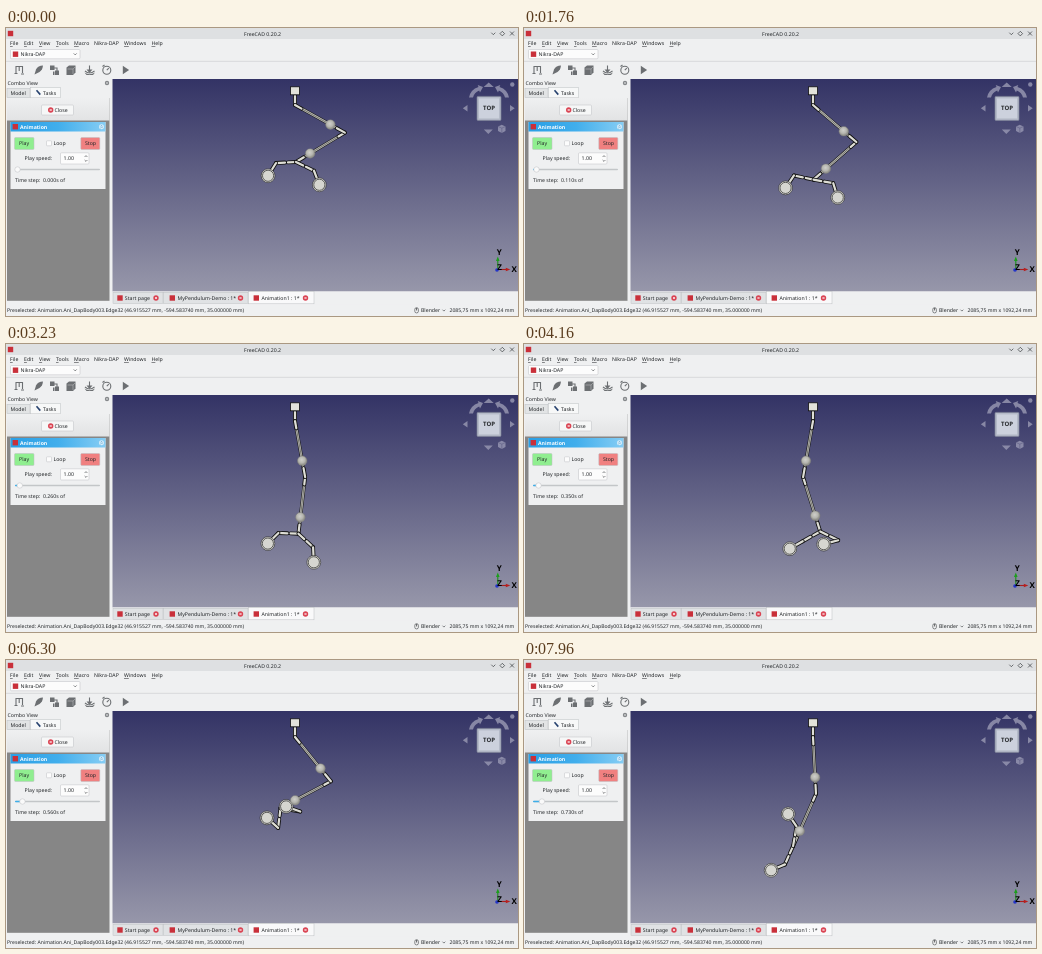
Animation of 512x288 px, one loop 8000 ms. Source, as an HTML page:

```html
<!DOCTYPE html>
<html lang="en">
<head>
<meta charset="utf-8">
<title>Pendulum animation</title>
<style>
  html, body { margin: 0; width: 100%; height: 100%; overflow: hidden; background: #eff0f1; }
  svg { display: block; width: 100vw; height: 100vh; }
  text { font: 5.2px "Noto Sans", sans-serif; fill: #232629; text-rendering: geometricPrecision; white-space: pre; }
  .bold { font-weight: 700; }
  .axis { font: 700 8px "Open Sans", sans-serif; fill: #000; }
  .u { text-decoration: underline; text-decoration-thickness: .3px; }
  .logo { fill: #c9303a; }
  .edge { stroke: #bcbfc2; stroke-width: .5; }
  .nav { fill: #9494b0; fill-opacity: .85; }
  .icon { fill: none; stroke: #6c6f72; stroke-width: 1.1; }
  .icon .solid { fill: #6c6f72; stroke: none; }
</style>
</head>
<body>
<svg viewBox="0 0 512 288">
  <defs>
    <linearGradient id="sky" x2="0" y2="1"><stop stop-color="#333365"/><stop offset="1" stop-color="#9797aa"/></linearGradient>
    <linearGradient id="head"><stop stop-color="#2a9fe5"/><stop offset=".5" stop-color="#41aeec"/><stop offset="1" stop-color="#86cdf4"/></linearGradient>
    <linearGradient id="strip" x2="0" y2="1"><stop stop-color="#eff0f1"/><stop offset="1" stop-color="#e2e3e4"/></linearGradient>
    <radialGradient id="ball" cx=".45" cy=".4"><stop stop-color="#cfcfca"/><stop offset=".65" stop-color="#b6b6b0"/><stop offset="1" stop-color="#94948e"/></radialGradient>
    <g id="close"><circle r="2.7" fill="#da4453"/><path d="M-1-1L1 1M1-1L-1 1" stroke="#fff" stroke-width=".7"/></g>
    <rect id="logo" class="logo" x="-2.7" y="-2.7" width="5.4" height="5.4"/>
  </defs>

  <!-- window frame, menus and toolbars -->
  <rect width="512" height="288" fill="#eff0f1"/>
  <rect width="512" height="11" fill="#dee0e2"/>
  <use href="#logo" x="4.5" y="5.5"/>
  <text x="238" y="7.6">FreeCAD 0.20.2</text>
  <path d="M485.300 4.700l2 2 2-2M496.300 3.300l2.300 2.300-2.300 2.300-2.300-2.300zM504 3.500l4 4M508 3.500l-4 4" fill="none" stroke="#34383c" stroke-width=".7"/>
  <g id="menu"></g>
  <rect class="edge" x="4.500" y="21.500" width="69.500" height="9.300" rx="1" fill="#fcfcfc"/>
  <use href="#logo" x="9.500" y="26.200"/>
  <text x="14.500" y="28">Nikra-DAP</text>
  <path d="M67.700 25.400l1.500 1.500 1.500-1.500" fill="none" stroke="#34383c" stroke-width=".6"/>
  <path class="edge" d="M0 33.300H512"/>
  <g class="icon">
    <path d="M10 45V38.500h6.500V45M13.200 38.500V43M8.500 45.500h3M15 46h3"/>
    <path class="solid" d="M28.500 46.500l1.500-5q2-4 7-4-.5 4.500-3.500 6.500z"/>
    <path d="M46.500 40h4.500v4.500"/>
    <path class="solid" d="M44 37.500h4.500V42H44zM49 42.500h4V47h-4zM47 43.500h1.500V47H47z"/>
    <path class="solid" d="M60.500 39.500l2.500-2h6.500v7l-2.500 2.500h-6.500z"/>
    <path d="M61.500 41h5.500l2-2M67 41v5" stroke="#b9bbbd" stroke-width=".6"/>
    <path d="M83.500 37.500v5M79 43q4.500 4 9.500 0"/>
    <path class="solid" d="M80.500 41.500h6l-3 3.500zM78.500 44.500q5 3.500 10.500 0l-2 2.500h-6.500z"/>
    <circle cx="100.800" cy="42.200" r="4"/><path d="M100.800 42.200l2-2M98.500 37l-2 1.500"/>
    <path class="solid" d="M116.800 37.800v8.400l6.300-4.200z"/>
  </g>

  <!-- task panel -->
  <text x="1.500" y="57.200">Combo View</text>
  <circle cx="101" cy="55" r="2.200" fill="#85888b"/>
  <path d="M100.200 54.200l1.600 1.600M101.800 54.200l-1.600 1.600" stroke="#fff" stroke-width=".5"/>
  <rect class="edge" x="1" y="60.500" width="23" height="9" fill="#e2e4e5"/>
  <rect class="edge" x="24.500" y="59.300" width="30" height="10.500" fill="#f7f8f8"/>
  <text x="4.500" y="66.800">Model</text>
  <path d="M30.500 62.300l3.800 4.300" stroke="#26416e" stroke-width="1.600"/>
  <text x="37" y="66.800">Tasks</text>
  <rect x="1" y="70" width="102.500" height="202.800" fill="#868686"/>
  <rect x="1" y="70" width="102.500" height="22.500" fill="url(#strip)"/>
  <rect class="edge" x="35.500" y="77" width="32" height="10" rx="1" fill="#f6f7f7"/>
  <use href="#close" x="44.700" y="82"/>
  <text x="48.500" y="83.900">Close</text>
  <rect x="4.500" y="94" width="95" height="67" fill="#eff0f1"/>
  <rect x="4.500" y="94" width="95" height="9.500" fill="url(#head)"/>
  <use href="#logo" x="9.300" y="98.700"/>
  <text x="14" y="100.600" class="bold" style="fill:#fff">Animation</text>
  <circle cx="95.500" cy="98.700" r="2.500" fill="#d9effb"/>
  <path d="M94.300 98.500l1.200-1.200 1.200 1.200M94.300 100.200l1.200-1.200 1.200 1.200" fill="none" stroke="#2f83bb" stroke-width=".5"/>
  <rect class="edge" x="8.500" y="109.500" width="19.500" height="12" rx="1" fill="#90ee90"/>
  <text x="13" y="117.300">Play</text>
  <rect class="edge" x="40.500" y="112.800" width="5" height="5" rx=".6" fill="#fcfcfc"/>
  <text x="47.500" y="117.300">Loop</text>
  <rect class="edge" x="74.800" y="109.500" width="19" height="12" rx="1" fill="#f08080"/>
  <text x="79" y="117.300">Stop</text>
  <text x="18.500" y="132.300">Play speed:</text>
  <rect class="edge" x="54.500" y="124.800" width="28.500" height="11.200" rx="1" fill="#fcfcfc"/>
  <text x="57.600" y="132.200">1.00</text>
  <path d="M78.600 129l1.400-1.400 1.400 1.400M78.600 132l1.400 1.400 1.400-1.400" fill="none" stroke="#34383c" stroke-width=".6"/>
  <rect x="9" y="140.700" width="85" height="1.600" rx=".8" fill="#c3c6c8"/>
  <rect id="filled" x="9" y="140.700" height="1.600" rx=".8" fill="#3daee9"/>
  <circle id="handle" class="edge" cy="141.500" r="2.700" fill="#fafafa"/>
  <text id="label" x="9" y="154.200"></text>

  <!-- 3D view -->
  <rect x="106.500" y="51" width="405.500" height="212.500" fill="url(#sky)"/>
  <g class="nav">
    <path d="M456.800 80.300l4.700-3.300v6.600zM508.700 80.300l-4.700-3.300v6.600zM482.300 106l-4.500-4.500h9zM482.700 54.500l-5 4.500h10z"/>
    <path d="M463 69.500q1.500-8 9.500-10.500l-.8-2 5.300 2-3 5.500-.8-2q-5 2-6.200 7zM503 69.500q-1.500-8-9.500-10.500l.8-2-5.300 2 3 5.500.8-2q5 2 6.200 7z"/>
    <circle cx="506.300" cy="56.500" r="2.200"/>
    <path d="M492 98.500l3.800-1.700 3.700 1.700v4.500l-3.700 2-3.800-2z"/>
    <path d="M492 98.500l3.800 1.600 3.700-1.600M495.800 100.100v4.900" fill="none" stroke="#57577e" stroke-width=".5"/>
  </g>
  <rect x="471" y="68.400" width="24" height="24" rx="1" fill="#b4bac8" stroke="#7d8296" stroke-width=".7"/>
  <rect x="473" y="70.400" width="20" height="20" fill="#ccd1dd"/>
  <text x="483" y="82.400" text-anchor="middle" class="bold" style="font-size:6px">TOP</text>
  <path d="M491.800 241.500V231" stroke="#1c8f1c" stroke-width="1.100"/>
  <path d="M490 233l1.800-4.500 1.800 4.500z" fill="#1c9f1c"/>
  <path d="M491.800 241.500H501" stroke="#a81e1e" stroke-width="1.100"/>
  <path d="M499.800 239.700l4.500 1.800-4.500 1.800z" fill="#b81e1e"/>
  <circle cx="491" cy="242" r="1.800" fill="#2435c8"/>
  <text class="axis" x="490.800" y="226.800">Y</text>
  <text class="axis" x="505.500" y="243.500">X</text>
  <text class="axis" x="491.300" y="242.300">Z</text>
  <g id="rig"></g>

  <!-- document tabs and status bar -->
  <rect x="106.500" y="263.500" width="405.500" height="13" fill="#eff0f1"/>
  <g class="edge" fill="#e0e2e4">
    <rect x="107" y="264.300" width="50" height="11"/>
    <rect x="157.500" y="264.300" width="84.500" height="11"/>
    <rect x="242.500" y="263.600" width="65.500" height="12.200" fill="#f9f9fa"/>
  </g>
  <use href="#logo" x="114" y="270"/><text x="118.800" y="271.800">Start page</text><use href="#close" x="150" y="270"/>
  <use href="#logo" x="166.300" y="270"/><text x="171.500" y="271.800">MyPendulum-Demo : 1*</text><use href="#close" x="234.500" y="270"/>
  <use href="#logo" x="250.300" y="270"/><text x="255.500" y="271.800">Animation1 : 1*</text><use href="#close" x="299.500" y="270"/>
  <text x="1" y="284.200" style="font-size:5.100px">Preselected: Animation.Ani_DapBody003.Edge32 (46.915527 mm, -594.583740 mm, 35.000000 mm)</text>
  <rect x="408.800" y="279.700" width="3.600" height="5.200" rx="1.700" fill="#f4f4f4" stroke="#3a3d40" stroke-width=".6"/>
  <path d="M410.600 280v2.500" stroke="#3a3d40" stroke-width=".8"/>
  <text x="415" y="284.200">Blender</text>
  <path d="M436.500 281.700l1.400 1.400 1.400-1.400" fill="none" stroke="#34383c" stroke-width=".6"/>
  <text x="443.500" y="284.200" style="font-size:5.100px">2085,75 mm x 1092,24 mm</text>
</svg>

<script>
const LOOP = 8000;
const $ = id => document.getElementById(id);

const menu = { File: 4, Edit: 18, View: 33, Tools: 50, Macro: 68, "Nikra-DAP": 88, Windows: 118, Help: 145.5 };
$("menu").innerHTML = Object.entries(menu).map(([name, x]) =>
  `<text x="${x}" y="17.300"><tspan class="${name[0] === "N" ? "" : "u"}">${name[0]}</tspan>${name.slice(1)}</text>`).join("");

// step, then angles in degrees: upper link, lower link, left arm, left tip, right arm, right tip
const KEYS = [
  [0, 29, 149, 177, 122, 26, 69],
  [17, 53.5, 125.5, 198, 127, 4, 78],
  [24, 73, 104, 189, 132, 35, 88],
  [29, 90, 86, 170, 140, 50, 92],
  [32, 99, 77, 159, 146, 44, 120],
  [35, 100, 72.5, 151, 150, 26, 165],
  [42, 77, 110, 112, 195, -38, 172],
  [48, 60, 134, 99, 247, -62, 162],
  [56, 51, 152, 97, 222, 10, 200],
  [65, 64, 156.6, 86, 158, 90, 307],
  [69, 74, 140, 98, 150, 8, 275],
  [73, 87, 113.7, 114, 157, -80, 236]
];

const slope = (i, c) => (KEYS[i + 1][c] - KEYS[i][c]) / (KEYS[i + 1][0] - KEYS[i][0]);

function tangent(i, c) {
  if (i === 0) return 0;
  if (i === KEYS.length - 1) return slope(i - 1, c);
  const before = slope(i - 1, c), after = slope(i, c);
  if (before * after <= 0) return 0;
  const a = KEYS[i][0] - KEYS[i - 1][0], b = KEYS[i + 1][0] - KEYS[i][0];
  return (before * b + after * a) / (a + b);
}

// cubic Hermite curve through the key angles
function angleAt(step, c) {
  let i = 0;
  while (i < KEYS.length - 2 && step >= KEYS[i + 1][0]) i++;
  const h = KEYS[i + 1][0] - KEYS[i][0], u = (step - KEYS[i][0]) / h, v = 1 - u;
  return KEYS[i][c] * (1 + 2 * u) * v * v + KEYS[i + 1][c] * (3 - 2 * u) * u * u
    + h * u * v * (tangent(i, c) * v - tangent(i + 1, c) * u);
}

const move = ([x, y], deg, length) =>
  [x + length * Math.cos(deg * Math.PI / 180), y + length * Math.sin(deg * Math.PI / 180)];
const mix = (p, q, k) => [p[0] + (q[0] - p[0]) * k, p[1] + (q[1] - p[1]) * k];
const line = (p, q, color, width) => `<path d="M${p}L${q}" stroke="${color}" stroke-width="${width}" stroke-linecap="round"/>`;
const bar = (p, q) => line(p, q, "#111", 3.9) + line(p, q, "#deded6", 2.2);
const rod = (p, q) => line(p, q, "#1a1a1a", 3.4) + line(p, q, "#c2c2bb", 2.2) + line(p, q, "#44443f", .6);
const disc = ([x, y], r, fill, stroke, width) =>
  `<circle cx="${x}" cy="${y}" r="${r}" fill="${fill}" stroke="${stroke}" stroke-width="${width}"/>`;

const link = (p, q) => rod(mix(p, q, .12), mix(p, q, .88)) + bar(p, mix(p, q, .13)) + bar(mix(p, q, .84), q);
const weight = (p, q) => disc(mix(p, q, .71), 4.8, "url(#ball)", "#7c7c76", .4);

function arm(hub, armAngle, tipAngle) {
  const elbow = move(hub, armAngle, 20), tip = move(elbow, tipAngle, 15);
  return bar(hub, mix(hub, elbow, .4)) + bar(mix(hub, elbow, .55), elbow) + bar(elbow, mix(elbow, tip, .55))
    + disc(tip, 6.9, "#e6e6df", "#222", .6) + disc(tip, 5.6, "#d6d6d0", "#222", .7);
}

function drawRig(step) {
  const [upper, lower, ...arms] = [1, 2, 3, 4, 5, 6].map(c => angleAt(step, c));
  const pivot = [289, 77], knee = move(pivot, upper, 57), hub = move(knee, lower, 57);
  $("rig").innerHTML = bar([289, 68], pivot)
    + '<rect x="284.500" y="58.800" width="9" height="8" fill="#e2e2da" stroke="#111" stroke-width=".8"/>'
    + link(knee, hub) + link(pivot, knee)
    + arm(hub, arms[0], arms[1]) + arm(hub, arms[2], arms[3])
    + weight(knee, hub) + weight(pivot, knee);
}

function stepAt(time) {
  const t = Math.max(0, time - 628);
  return Math.floor(t / 200) * 2 + (t % 200 >= 130 ? 1 : 0);
}

let shown = -1;
function frame() {
  const step = stepAt(performance.now() % LOOP);
  if (step !== shown) {
    shown = step;
    const x = 11.5 + step * .088;
    $("handle").setAttribute("cx", x);
    $("filled").setAttribute("width", x - 9);
    $("label").textContent = `Time step:  ${(step / 100).toFixed(3)}s of`;
    drawRig(step);
  }
  requestAnimationFrame(frame);
}
frame();
</script>
</body>
</html>
```
